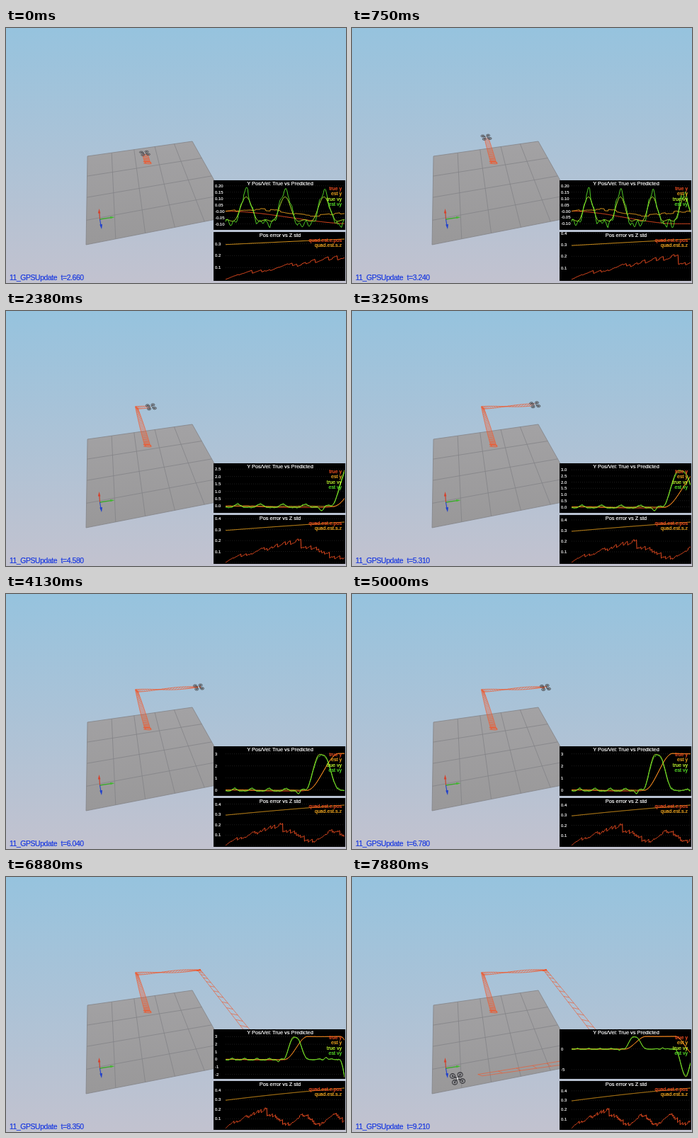
Animation, 480 px wide and 360 px high, one loop 8000 ms. Source, as an HTML page:

```html
<!DOCTYPE html>
<html lang="en">
<head>
<meta charset="utf-8">
<title>Quadrotor GPS update</title>
<style>
html, body { margin: 0; width: 100%; height: 100%; overflow: hidden; }
body { background: #9fc4dc; }
svg { display: block; width: 480px; height: 360px; font-family: "Liberation Sans", Arial, sans-serif; }
path { fill: none; }
.status { font-size: 10.4px; letter-spacing: -.4px; fill: #1838e0; stroke: #1838e0; stroke-width: .2; }
.title { font-size: 7.4px; fill: #fff; stroke: #fff; stroke-width: .2; text-anchor: middle; }
.legend { font-size: 7.1px; stroke-width: .2; text-anchor: end; }
.tick { font-size: 5.9px; fill: #fff; stroke: #fff; stroke-width: .15; }
</style>
</head>
<body>
<svg viewBox="0 0 480 360">
  <defs>
    <linearGradient id="sky" x1="0" y1="0" x2="0" y2="1">
      <stop offset="0" stop-color="#96c3de"/>
      <stop offset="1" stop-color="#c2c2cf"/>
    </linearGradient>
    <linearGradient id="ground" x1="0" y1="0" x2="0" y2="1">
      <stop offset="0" stop-color="#a3a2a4"/>
      <stop offset="1" stop-color="#999899"/>
    </linearGradient>
    <clipPath id="frame"><rect x="294" y="216" width="184" height="140"/></clipPath>
  </defs>
  <rect width="480" height="360" fill="url(#sky)"/>
  <path id="floor" style="fill:url(#ground)" stroke="#838387" stroke-width=".8"/>
  <path id="grid" stroke="#838387" stroke-width=".8"/>
  <path d="M132.5 270L131.8 260" stroke="#cc3a24" stroke-width="1.1"/>
  <path d="M132.5 270L150 267.4" stroke="#3aa82c" stroke-width="1.3"/>
  <path d="M132.5 270L134 279" stroke="#2040cc" stroke-width="1.1"/>
  <polygon points="131.5,255 129.9,261.5 133.3,261.5" fill="#d8402a"/>
  <polygon points="153.5,267 147,266 147.4,269.2" fill="#44b832"/>
  <polygon points="135,284 132.2,277.5 136,277" fill="#2040cc"/>
  <path id="trail" stroke="#f0582e" stroke-width=".65"/>
  <g id="drone"></g>
  <g id="plots"></g>
  <text class="status" x="5" y="356">11_GPSUpdate</text>
  <text class="status" x="77.5" y="356" id="clock"></text>
</svg>
<script>
const $ = id => document.getElementById(id);
const { sin, cos, floor, min, max, PI } = Math;

function add(parent, tag, attrs, text = '') {
  const el = document.createElementNS('http://www.w3.org/2000/svg', tag);
  for (const name in attrs) el.setAttribute(name, attrs[name]);
  el.textContent = text;
  return parent.appendChild(el);
}

const mix = (a, b, p) => a + (b - a) * p;
const part = (a, b, x) => min(1, max(0, (x - a) / (b - a)));
const smooth = p => p * p * (3 - 2 * p);
const ease = (a, b, x) => smooth(part(a, b, x));
const bell = (mid, width, x) => Math.exp(-(((x - mid) / width) ** 2));
const rnd = n => { // repeatable, -1..1
  const s = sin(n * 127.1 + 11.7) * 43758.5453;
  return 2 * (s - floor(s)) - 1;
};

// Simulation clock: [step, seconds]
const ticks = [[0, 2.66], [11, 3.72], [19, 4.58], [33, 6.04], [47, 7.52], [55, 8.35], [63, 9.21]];
function simTime(k) {
  const i = max(1, ticks.findIndex(r => r[0] >= k));
  const [k0, t0] = ticks[i - 1], [k1, t1] = ticks[i];
  return mix(t0, t1, (k - k0) / (k1 - k0));
}

// Signals over simulation time
const wave = s => {
  const a = 2 * PI * (s - .46) / .87;
  return -.02 + .12 * cos(a) + .05 * cos(2 * a);
};
const motion = s => 2.9 * (ease(4.05, 4.75, s) - ease(5, 5.75, s)) - .28 * bell(3.7, .1, s)
  - 6.7 * ease(8, 8.85, s) + 4.4 * ease(8.85, 9.4, s) + .3 * bell(7.05, .12, s);
const calm = s => 1 - .5 * ease(3.2, 3.8, s);
const trueV = s => motion(s) + .75 * calm(s) * wave(s);
const estV = s => .96 * motion(s) + calm(s) * wave(s) + .02 * sin(s * 43)
  + (.02 + .05 * ease(4, 5, s)) * rnd(floor(s * 10));
const travel = s => 3.02 * ease(4.15, 5.75, s) - 4.4 * ease(8.05, 9.5, s);
const drift = s => -.1 * ease(0, 2.9, s) * (1 - ease(3.6, 4.5, s));
const trueY = s => travel(s) + drift(s);
const estY = s => travel(s) + .2 * drift(s) + .018 * sin(s * 2.6 - .3) + .009 * rnd(floor(s * 9) + 200);
const posError = s => {
  const u = floor(s * 10) / 10;
  const base = u < 2.9 ? .2 * (u / 2.9) ** .8 : .085 + .05 * cos(2 * PI * (u - 5.4) / 2.2);
  return max(0, base + .016 * rnd(u * 10 + 90) * min(1, u * 3) + .15 * (s - u));
};
const zStd = s => .293 + .0185 * s - .0004 * s * s;

const DS = .015;
const colors = { red: '#ff5424', orange: '#ffb022', lime: '#c6ff30', green: '#5ae62a' };

function makePlot(top, bottom, title, series) {
  const g = add($('plots'), 'g');
  add(g, 'rect', { x: 293, y: top, width: 186, height: bottom - top });
  const inner = add(g, 'g', { 'clip-path': 'url(#frame)' });
  const lines = add(inner, 'path', { stroke: '#3a3a3a', 'stroke-width': .5, 'stroke-dasharray': '1 2' });
  const labels = add(g, 'g');
  const list = series.map(([name, color, fn], i) => {
    const tint = colors[color];
    add(g, 'text', { class: 'legend', x: 474, y: top + 14.2 + 7.2 * i, fill: tint, stroke: tint }, name);
    const data = Array.from({ length: 9.21 / DS + 1 | 0 }, (_, n) => fn(n * DS));
    return { data, fn, line: add(inner, 'path', { stroke: tint, 'stroke-width': .9 }) };
  });
  add(g, 'text', { class: 'title', x: 387, y: top + 7.2 }, title);
  return { top, lines, labels, list };
}

const plot1 = makePlot(215, 285, 'Y Pos/Vel: True vs Predicted', [
  ['true y', 'red', trueY], ['est y', 'orange', estY],
  ['true vy', 'lime', trueV], ['est vy', 'green', estV]
]);
const plot2 = makePlot(288, 357, 'Pos error vs Z std', [
  ['quad.est.e.pos', 'red', posError], ['quad.est.s.z', 'orange', zStd]
]);

function drawPlot({ top, lines, labels, list }, t, lo, hi, step) {
  const Y = v => mix(top + 67, top + 10, (v - lo) / (hi - lo));
  const last = floor(t / DS);
  for (const { data, fn, line } of list) {
    const points = data.slice(0, last + 1)
      .map((v, i) => `${(310 + 168 * i * DS / t).toFixed(1)} ${Y(v).toFixed(1)}`);
    line.setAttribute('d', `M${points.join('L')}L478 ${Y(fn(t)).toFixed(1)}`);
  }
  const digits = step < .1 ? 2 : step < 1 ? 1 : 0;
  let d = '';
  labels.textContent = '';
  for (let i = floor(lo / step); i <= hi / step + 1; i++) {
    const y = Y(i * step);
    if (y < top + .8 || y > top + 68) continue;
    d += `M310 ${y}H478`;
    if (y > top + 64.4) continue;
    const sign = i === 0 && step < .5 ? '-' : '';
    add(labels, 'text', { class: 'tick', x: 295, y: y + 2 }, sign + (i * step).toFixed(digits));
  }
  lines.setAttribute('d', d);
}

function drawPlots(t) {
  const seen = plot1.list.flatMap(({ data }) => data.slice(0, floor(t / DS) + 1));
  const lo = min(...seen), hi = max(...seen);
  const step = [.05, .1, .5, 1, 5].find(s => (hi - lo) / s <= 6.7);
  drawPlot(plot1, t, lo, hi, step);
  drawPlot(plot2, t, 0, zStd(t), .1);
}

// Floor: edges are split with a little perspective
const corners = { A: [115, 181], B: [263, 160], C: [322, 265], D: [113, 306] };
function split(from, to, p, bend) {
  const q = p * (1 + bend) / (1 + bend * p);
  return corners[from].map((v, i) => mix(v, corners[to][i], q)).join(' ');
}
$('floor').setAttribute('d', `M${Object.values(corners).join('L')}Z`);
let mesh = '';
for (let i = 1; i < 5; i++) mesh += `M${split('A', 'B', i / 5, .2)}L${split('D', 'C', i / 5, 0)}`;
for (let i = 1; i < 4; i++) mesh += `M${split('A', 'D', i / 4, -.13)}L${split('B', 'C', i / 4, -.13)}`;
$('grid').setAttribute('d', mesh);

// Flight legs between steps; half is the ribbon's half width along the leg
const legs = [
  { span: [-7, 14], from: [200, 191], to: [184.5, 136.5], curve: smooth, half: p => [4 - 2 * p * p, .3 + 1.2 * p * p] },
  { span: [14, 30], from: [184.5, 136.5], to: [272, 131.5], curve: smooth, half: p => [1.6 + p, 1.8 * cos(4.5 * p)] },
  { span: [40, 51], from: [273, 132], to: [372, 256], curve: smooth, half: p => [2.8 + 4 * p, .6 + p] },
  { span: [53, 63], from: [372, 251], to: [149, 284.5], curve: p => p ** 3, half: p => [3, 3 - 2.2 * p] }
];
function pose(k) {
  const { span, from, to, curve, half } = legs.findLast(l => k >= l.span[0]);
  const p = curve(part(...span, k));
  const [dx, dy] = half(p);
  return { x: mix(from[0], to[0], p), y: mix(from[1], to[1], p), dx, dy };
}

function drawTrail(k) {
  const left = [], right = [];
  let rungs = '';
  for (let q = -7; q < k; q += .5) {
    const { x, y, dx, dy } = pose(q);
    const shake = q < -4 ? 1.6 : 0;
    const jx = x + shake * rnd(q), jy = y + shake * rnd(q + 40);
    left.push(`${jx - dx} ${jy - dy}`);
    right.push(`${jx + dx} ${jy + dy}`);
    rungs += `M${left.at(-1)}L${right.at(-1)}`;
  }
  $('trail').setAttribute('d', `M${left.join('L')}M${right.join('L')}${rungs}`);
}

const drone = $('drone');
add(drone, 'path', { d: 'M-5 -2L5 2M2.6 -3L-2.8 3', stroke: '#3a3a3e', 'stroke-width': 1 });
for (const [cx, cy] of [[-5, -2], [2.6, -3], [-2.8, 3], [5, 2]]) {
  add(drone, 'ellipse', { cx, cy, rx: 2.6, ry: 1.8, fill: '#85858a', 'fill-opacity': .6, stroke: '#333337', 'stroke-width': .65 });
  add(drone, 'circle', { cx, cy, r: .6, fill: '#222' });
}
add(drone, 'circle', { r: 1, fill: '#d8d8da' });

function drawDrone(k) {
  const { x, y } = pose(k), near = part(45, 63, k);
  const sy = .75 + .2 * part(0, 10, k) + .85 * near;
  drone.setAttribute('transform', `translate(${x} ${y}) scale(${1 + .4 * near} ${sy})`);
}

let shown = -1;
function render(ms) {
  const k = floor(floor(ms % 8000 / 10) / 12.5);
  if (k === shown) return;
  shown = k;
  const t = simTime(k);
  $('clock').textContent = `t=${t.toFixed(2)}0`;
  drawTrail(k);
  drawDrone(k);
  drawPlots(t);
}

const start = performance.now();
function loop() {
  render(performance.now() - start);
  requestAnimationFrame(loop);
}
loop();
</script>
</body>
</html>
```
